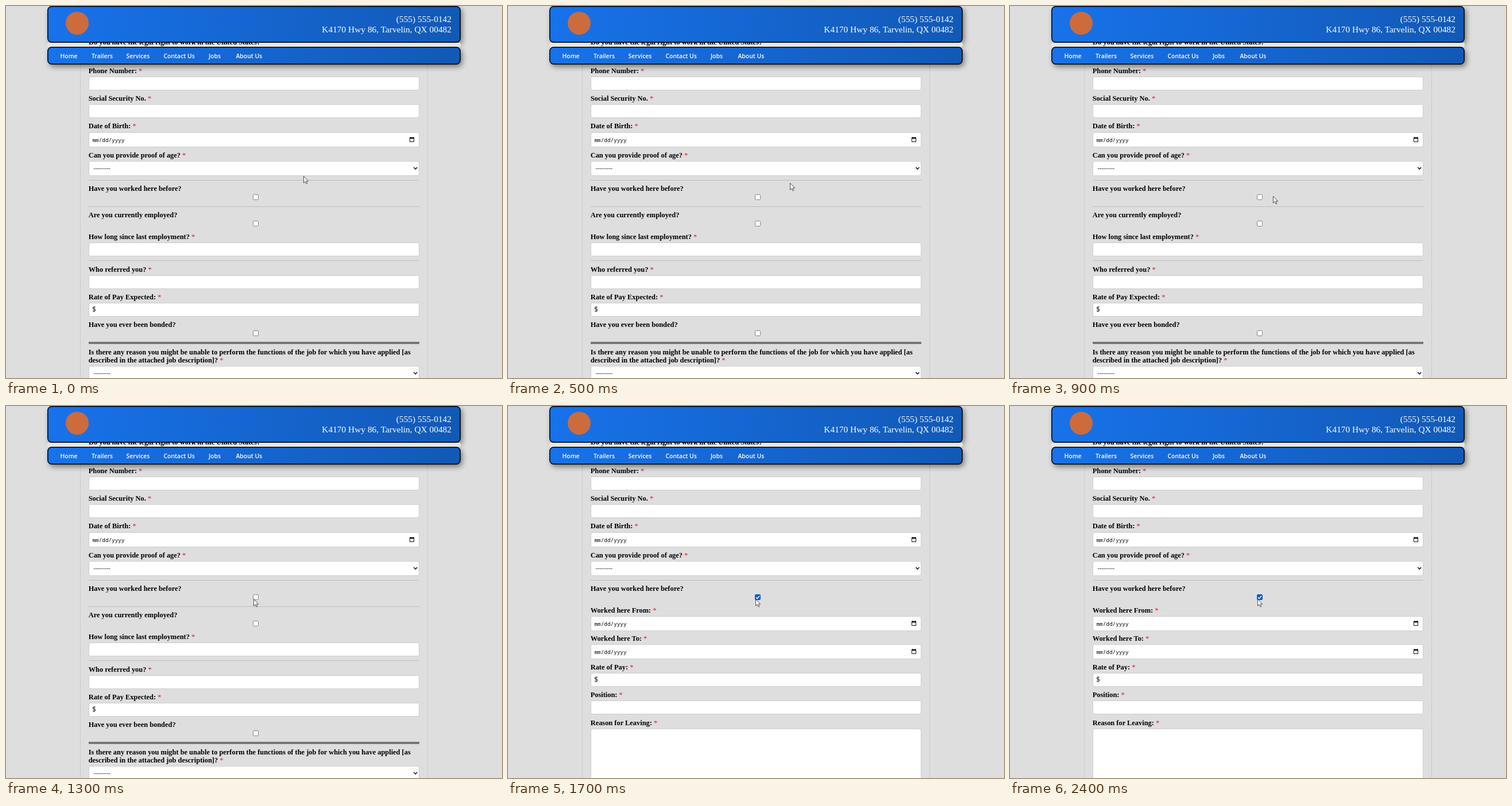
Write an HTML page that moves like this. It is 864 by 648 pixels and loops after 2500 ms.

```html
<!DOCTYPE html>
<html lang="en">
<head>
<meta charset="utf-8">
<title>Application form</title>
<style>
  html, body { margin: 0; width: 100%; height: 100%; overflow: hidden; background: #dedede; }
  #stage { display: block; width: 864px; height: 648px; }
  text { white-space: pre; }
  .label { font: bold 12.4px "Liberation Serif", serif; fill: #000; }
  .star { font-weight: normal; fill: #e81010; }
  .date { font: 9.35px "Noto Sans Mono", monospace; fill: #000; }
  .value { font: 12.4px "Open Sans", sans-serif; fill: #111; }
  .choice { font: 10.2px "Open Sans", sans-serif; fill: #111; }
  .nav { font: 600 10.4px "Open Sans", sans-serif; fill: #fff; }
  .contact { font: 15.4px "Liberation Serif", serif; fill: #fff; text-anchor: end; }
  .field { fill: #fff; stroke: #cecece; }
  .box { fill: #fff; stroke: #767676; stroke-width: .9; }
  .rule { fill: #bdbdbd; }
  .bar { fill: url(#blue); stroke: #000; stroke-width: 1.5; }
  .shade { filter: drop-shadow(3px 4px 5px rgba(0, 0, 0, .45)); }
</style>
</head>
<body>
<svg id="stage" viewBox="0 0 864 648">
  <defs>
    <linearGradient id="blue">
      <stop offset="0" stop-color="#1872ea"/>
      <stop offset="1" stop-color="#1259b6"/>
    </linearGradient>
  </defs>
  <rect width="864" height="648" fill="#dedede"/>
  <path d="M129.5 64V648M734.5 64V648" stroke="#cbcbcb"/>
  <g id="common"></g>
  <g id="plain"></g>
  <g id="expanded"></g>

  <g class="shade">
    <rect class="bar" x="72.75" y=".75" width="718.5" height="62.5" rx="7"/>
    <rect class="bar" x="72.75" y="71.75" width="718.5" height="29.5" rx="7"/>
  </g>
  <svg x="72" y="64" width="720" height="7">
    <rect width="720" height="7" fill="#e6e6e6"/>
    <text class="label" x="72" y="3">Do you have the legal right to work in the United States?</text>
  </svg>
  <circle cx="124" cy="30" r="20" fill="#cc6c3c"/>
  <text class="contact" x="776" y="28">(555) 555-0142</text>
  <text class="contact" x="776" y="46">K4170 Hwy 86, Tarvelin, QX 00482</text>
  <g id="menu"></g>

  <path id="cursor" d="M0 0V11.6L2.7 9.2L4.6 13.4L6.4 12.6L4.6 8.6H8.1Z"
        fill="#fff" stroke="#3a3a3a" stroke-width=".9" stroke-linejoin="round"/>
</svg>
<script>
const $ = id => document.getElementById(id);
const LEFT = 144, WIDTH = 576;

const label = (y, text, required) =>
  `<text class="label" x="${LEFT - .3}" y="${y}">${text}${required ? ' <tspan class="star">*</tspan>' : ''}</text>`;

const field = (y, h = 24) =>
  `<rect class="field" x="${LEFT + .5}" y="${y + .5}" width="${WIDTH - 1}" height="${h - 1}" rx="2.5"/>`;

const money = y => field(y) + `<text class="value" x="150" y="${y + 15.8}">$</text>`;

const date = y => field(y, 26) +
  `<text class="date" x="150.5" y="${y + 16.5}">mm/dd/yyyy</text>
   <path d="M703.5 ${y + 9.5}h7v7h-7z" fill="none" stroke="#111"/>
   <path d="M703 ${y + 8.8}h8v2.4h-8zM704.2 ${y + 8}h1.2v2h-1.2zM708.6 ${y + 8}h1.2v2h-1.2z" fill="#111"/>`;

const select = y => field(y, 26) +
  `<text class="choice" x="152.5" y="${y + 16}">---------</text>
   <path d="M710.3 ${y + 11}l3 3.2l3-3.2" fill="none" stroke="#111" stroke-width="1.6"/>`;

const check = y => `<rect class="box" x="430.5" y="${y - 4.5}" width="9" height="9" rx="1.8"/>`;

const checked = y =>
  `<rect x="430" y="${y - 5}" width="10" height="10" rx="2" fill="#0b5cc8"/>
   <path d="M432 ${y + .2}l2.1 2.2l4-4.7" fill="none" stroke="#fff" stroke-width="1.4"/>`;

const rule = y => `<rect class="rule" x="${LEFT}" y="${y}" width="${WIDTH}" height="1"/>`;

$('common').innerHTML =
  label(117, 'Phone Number:', true) + field(123) +
  label(165, 'Social Security No.', true) + field(171) +
  label(213, 'Date of Birth:', true) + date(220) +
  label(263.7, 'Can you provide proof of age?', true) + select(270) +
  rule(303) +
  label(322, 'Have you worked here before?');

$('plain').innerHTML =
  check(333) + rule(349) +
  label(368, 'Are you currently employed?') + check(379) +
  label(405.5, 'How long since last employment?', true) + field(412) +
  rule(443) +
  label(462.5, 'Who referred you?', true) + field(469) +
  label(510.5, 'Rate of Pay Expected:', true) + money(517) +
  label(559, 'Have you ever been bonded?') + check(570) +
  `<path d="M${LEFT} 585.9h${WIDTH}M${LEFT} 587.9h${WIDTH}" stroke="#111"/>` +
  label(606.5, 'Is there any reason you might be unable to perform the functions of the job for which you have applied [as') +
  label(620.5, 'described in the attached job description]?', true) + select(627);

$('expanded').innerHTML =
  checked(333) +
  label(359.5, 'Worked here From:', true) + date(366) +
  label(409, 'Worked here To:', true) + date(415) +
  label(459, 'Rate of Pay:', true) + money(465) +
  label(507, 'Position:', true) + field(513) +
  label(555.5, 'Reason for Leaving:', true) + field(562, 120);

const menu = [['Home', 94.5], ['Trailers', 149], ['Services', 209.5],
  ['Contact Us', 274.5], ['Jobs', 353], ['About Us', 400.5]];
$('menu').innerHTML = menu.map(([name, x]) => `<text class="nav" x="${x}" y="91">${name}</text>`).join('');

const LOOP = 2500, TICK = 100, CLICK = 1400;
const path = [[0, 518, 296], [500, 491, 308], [900, 458, 331], [1300, 431, 336]];

function cursorAt(t) {
  const next = path.findIndex(p => p[0] > t);
  if (next < 0) return path[path.length - 1].slice(1);
  const [t0, x0, y0] = path[next - 1], [t1, x1, y1] = path[next];
  const k = (t - t0) / (t1 - t0);
  return [x0 + (x1 - x0) * k, y0 + (y1 - y0) * k].map(Math.round);
}

function draw() {
  const t = Math.floor(performance.now() % LOOP / TICK) * TICK;
  const [x, y] = cursorAt(t);
  $('cursor').setAttribute('transform', `translate(${x + .5} ${y + .5})`);
  $('plain').style.display = t < CLICK ? '' : 'none';
  $('expanded').style.display = t < CLICK ? 'none' : '';
  requestAnimationFrame(draw);
}
draw();
</script>
</body>
</html>
```
